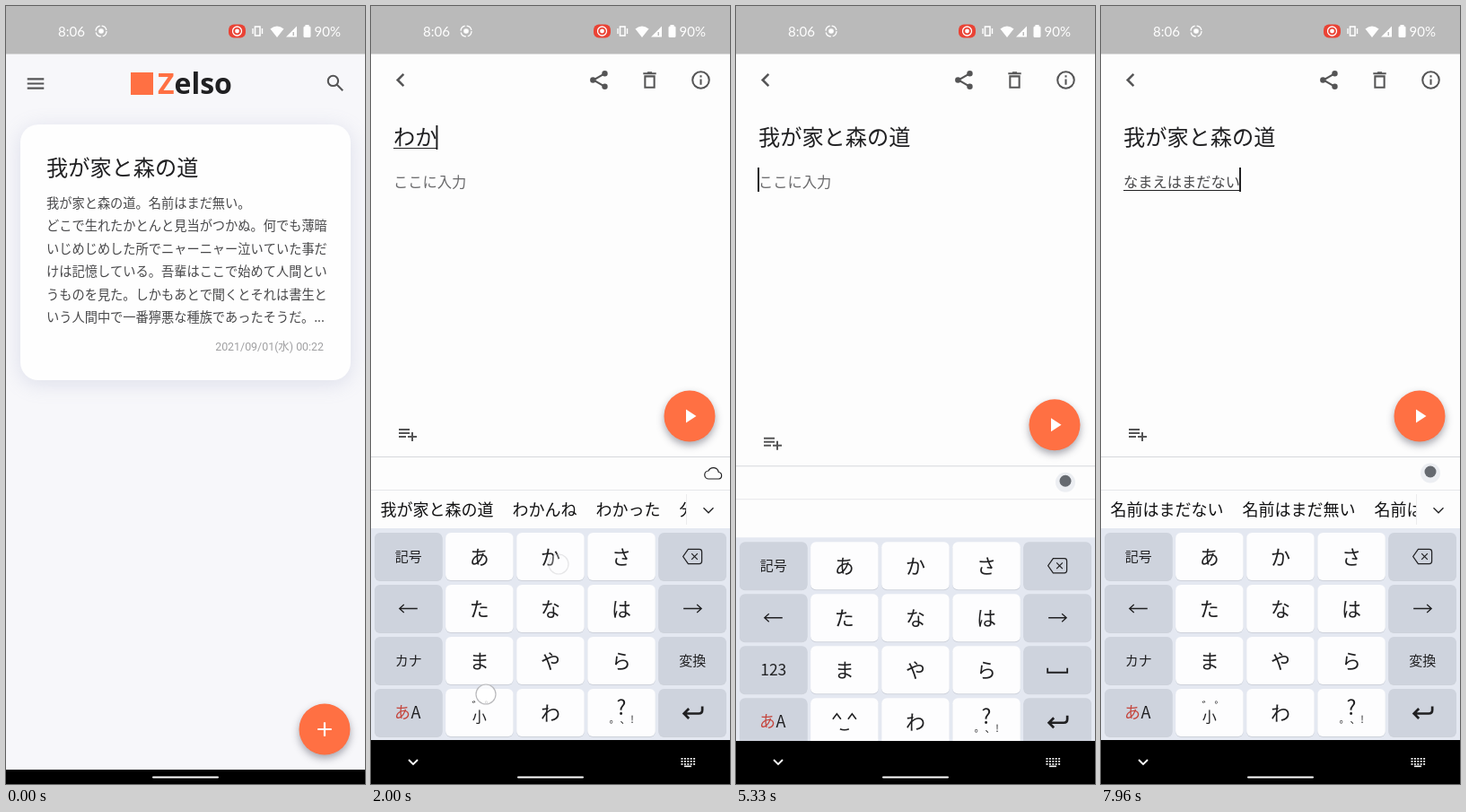
Animation of 400 by 867 pixels, one loop 8000 ms. Source, as an HTML page with a canvas:

```html
<!DOCTYPE html>
<html lang="ja">
<head>
<meta charset="utf-8">
<style>
  html, body { margin: 0; width: 100%; height: 100%; overflow: hidden; background: #000; }
  canvas { display: block; width: 400px; height: 867px; }
</style>
</head>
<body>
<canvas id="stage"></canvas>
<script>
const LOOP = 8000, W = 400, H = 867;
const JP = '"Noto Sans CJK JP", "Noto Sans CJK", sans-serif';
const ORANGE = '#ff7043', WHITE = '#fefefe', INK = '#202022', ICON = '#555556';
const PAPER = '#fdfdfd', STATUS = '#bababa';
const TITLE = '我が家と森の道';
const STORY = [
  TITLE + '。名前はまだ無い。',
  'どこで生れたかとんと見当がつかぬ。何でも薄暗',
  'いじめじめした所でニャーニャー泣いていた事だ',
  'けは記憶している。吾輩はここで始めて人間とい',
  'うものを見た。しかもあとで聞くとそれは書生と',
  'いう人間中で一番獰悪な種族であったそうだ。...'
];

// Text held by each field from a given time on
const TITLE_STEPS = [[0, ''], [1600, 'わ'], [1910, 'わか'], [2090, 'わが'], [2450, 'わがは'], [3000, TITLE]];
const BODY_STEPS = [[0, ''], [5750, 'な'], [6000, 'なま'], [6230, 'なまえ'], [6500, 'なまえは'], [6800, 'なまえはま'],
  [7030, 'なまえはまた'], [7230, 'なまえはまだ'], [7450, 'なまえはまだな'], [7640, 'なまえはまだない']];
// Touches: time, x, y, horizontal flick
const TAPS = [[120, 355, 806], [1000, 90, 148], [1500, 203, 790], [1810, 209, 622], [1990, 128, 767], [2350, 283, 668],
  [2900, 78, 562], [4150, 47, 842], [5030, 90, 197], [5650, 204, 668], [5900, 124, 730], [6130, 118, 612, 32],
  [6400, 277, 646], [6700, 124, 727], [6930, 122, 670], [7130, 126, 785], [7350, 203, 670], [7540, 122, 613, -32]];
const CANDIDATES = {
  'わ': ['私', 'わ', '私は', '分かる', 'ワ'],
  'わか': [TITLE, 'わかんね', 'わかった', '分かる'],
  'わが': [TITLE, '我が', '我が家', 'わが'],
  'わがは': [TITLE, 'わがは', 'ワガハ'],
  [TITLE]: ['の', 'に', 'で'],
  'な': ['な', 'なら', '何', '名前', '内容'],
  'なま': ['名前', '生', 'なま', '名前は', 'ナマ'],
  'なまえ': ['名前', '名前は', '名前の', 'なまえ', 'ナマエ'],
  'なまえは': ['名前は', '名前はまだ', 'なまえは', 'ナマエハ'],
  'なまえはま': ['名前はま', '名前はまだ', 'なまえはま'],
  'なまえはまた': ['名前はまた', '名前は又', 'なまえはまた'],
  'なまえはまだ': ['名前はまだ', '名前は未だ', 'なまえはまだ'],
  'なまえはまだな': ['名前はまだな', '名前はまだない', '名前は'],
  'なまえはまだない': ['名前はまだない', '名前はまだ無い', '名前は未だない']
};
// Stroked icons on a 24 unit grid
const ICONS = {
  menu: 'M3 7h18M3 12h18M3 17h18',
  search: 'M15 9.5a5.5 5.5 0 1 1-11 0a5.5 5.5 0 1 1 11 0M14 14l6 6',
  back: 'M15 6L9 12l6 6',
  share: 'M18 5L6 12l12 7',
  trash: 'M7 8v12h10V8zM5 5h14M9.5 4h5',
  info: 'M21 12a9 9 0 1 1-18 0a9 9 0 1 1 18 0M12 11v6M12 7v2',
  addList: 'M2 7h12M2 11h12M2 15h8M17 10v10M12 15h10',
  plus: 'M12 5v14M5 12h14',
  down: 'M7 9.5l5 5 5-5',
  cloud: 'M7 18.5a4.5 4.5 0 0 1-.5-9a6 6 0 0 1 11.3 1.5a3.8 3.8 0 0 1 .2 7.5z',
  clear: 'M21 12a9 9 0 1 1-18 0a9 9 0 1 1 18 0M8.5 8.5l7 7M15.5 8.5l-7 7',
  erase: 'M7 3.5h13a3 3 0 0 1 3 3v11a3 3 0 0 1-3 3H7L1 12zM11 8.5l7 7M18 8.5l-7 7',
  left: 'M22 12H2M7 7.5L2 12l5 4.5',
  right: 'M2 12h20M17 7.5l5 4.5-5 4.5',
  space: 'M1 10v5h22v-5',
  enter: 'M23 5v4q0 4-4 4H3M8 7.5L2.5 13 8 18.5',
  smile: 'M-1 9l4.5-6 4.5 6M16 9l4.5-6 4.5 6M7 20q5 2 10 0'
};

const canvas = document.getElementById('stage');
const ratio = window.devicePixelRatio || 1;
canvas.width = W * ratio;
canvas.height = H * ratio;
const c = canvas.getContext('2d');

const clamp = v => Math.max(0, Math.min(1, v));
const easeOut = v => 1 - (1 - clamp(v)) ** 3;
const latest = (steps, t) => steps.filter(s => s[0] <= t).pop();

function rect(x, y, w, h, color, radius = 0) {
  c.fillStyle = color;
  c.beginPath();
  c.roundRect(x, y, w, h, radius);
  c.fill();
}
function circle(x, y, r, color) {
  c.fillStyle = color;
  c.beginPath();
  c.arc(x, y, r, 0, 7);
  c.fill();
}
function ring(x, y, r, color, width) {
  c.strokeStyle = color;
  c.lineWidth = width;
  c.beginPath();
  c.arc(x, y, r, 0, 7);
  c.stroke();
}
function shape(color, ...points) {
  c.fillStyle = color;
  c.beginPath();
  points.forEach(p => c.lineTo(...p));
  c.fill();
}
// y is the optical centre of the line
function text(str, x, y, size, color = INK, align = 'left', font = JP) {
  c.font = `${size}px ${font}`;
  c.textAlign = align;
  c.fillStyle = color;
  c.fillText(str, x, y + size * 0.37);
  return c.measureText(str).width;
}
function icon(name, x, y, scale = 1.03, color = ICON, width = 2) {
  c.save();
  c.translate(x - 12 * scale, y - 12 * scale);
  c.scale(scale, scale);
  c.strokeStyle = color;
  c.lineWidth = width;
  c.stroke(new Path2D(ICONS[name]));
  c.restore();
}
function shadow(color, blur, y, draw) {
  c.save();
  c.shadowColor = color;
  c.shadowBlur = blur * ratio;
  c.shadowOffsetY = y * ratio;
  draw();
  c.restore();
}

function statusBar() {
  rect(0, 0, W, 53.5, STATUS);
  text('8:06', 58, 28.5, 15, WHITE, 'left', 'Lato, sans-serif');
  text('90%', 343.5, 28.5, 15, WHITE, 'left', 'Lato, sans-serif');
  c.setLineDash([7.4, 2]);
  ring(106, 28, 6, WHITE, 1.3);
  c.setLineDash([]);
  circle(106, 28, 2.8, WHITE);
  rect(248, 20.5, 19, 15, '#ea4335', 6);
  ring(257.5, 28, 5, WHITE, 1.3);
  circle(257.5, 28, 2.4, WHITE);
  c.strokeStyle = WHITE;
  c.lineWidth = 1.6;
  c.strokeRect(277.5, 23, 5.5, 10);
  rect(274.3, 25, 1.4, 6, WHITE);
  rect(284.8, 25, 1.4, 6, WHITE);
  c.fillStyle = WHITE;
  c.beginPath();
  c.moveTo(302, 35);
  c.lineTo(294.5, 25.5);
  c.quadraticCurveTo(302, 19.5, 309.5, 25.5);
  c.fill();
  shape(WHITE, [312, 34.5], [324, 34.5], [324, 22.5]);
  rect(319.5, 29, 1.5, 4, STATUS);
  rect(331.5, 22.5, 8, 12.5, WHITE, 1.5);
  rect(333.5, 21, 4, 2, WHITE);
}

function home() {
  rect(0, 53, W, 814, '#f7f7fa');
  icon('menu', 33, 86.5);
  icon('search', 367, 86);
  rect(139, 74, 25, 25, ORANGE);
  c.font = 'bold 32px "Noto Sans", sans-serif';
  c.textAlign = 'left';
  c.fillStyle = ORANGE;
  c.fillText('Z', 169, 98);
  const first = c.measureText('Z').width;
  c.fillStyle = INK;
  c.fillText('elso', 169 + first, 98);
  shadow('rgba(140,145,190,.24)', 22, 4, () => rect(16, 132, 368, 285, '#fefefe', 20));
  text(TITLE, 45, 180.5, 24.2);
  STORY.forEach((line, i) => text(line, 45, 219.5 + i * 25.5, 14.22, '#48484a'));
  text('2021/09/01(水) 00:22', 354, 379.5, 12.4, '#a0a0a2', 'right', 'Roboto, ' + JP);
}

function field(value, hint, y, size, composing, cursor) {
  const large = size > 20;
  const width = text(value, 25, y, size, large ? INK : '#48484a');
  if (!value) text(hint, 25, y, size, '#6a6a6c');
  if (composing) rect(25, y + (large ? 11.5 : 9.5), width, 1, INK);
  if (cursor) rect(24 + width, y - (large ? 13.5 : 15.5), 2, 27, INK);
}

function editor(s) {
  const { enter, inset } = s;
  c.save();
  c.globalAlpha = clamp(enter * 1.5);
  rect(0, 53, W, 814, PAPER);
  c.translate(0, (1 - enter) * 40);
  icon('back', 33, 82.5, 1.11, ICON, 2.3);
  icon('share', 254, 82.5);
  [[260.5, 75.2], [247.3, 82.5], [260.5, 89.8]].forEach(p => circle(...p, 3.2, ICON));
  icon('trash', 310.5, 82.5);
  icon('info', 367.5, 82.5);
  field(s.title, 'タイトル', 146.5, 24.2, s.focus === 'title' && s.composing, s.focus === 'title' && s.cursor);
  field(s.body, 'ここに入力', 195.5, 16.25, s.focus === 'body' && s.composing, s.focus === 'body' && s.cursor);
  icon('addList', 41, 826 - inset - (1 - enter) * 200, 1);
  c.restore();
}

function fab(enter, inset) {
  const y = 806 - inset;
  shadow('rgba(50,50,70,.42)', 8, 4, () => circle(355, y, 28.5, ORANGE));
  c.globalAlpha = 1 - clamp(enter * 1.5);
  icon('plus', 355, y, 1.11, WHITE);
  c.globalAlpha = clamp(enter * 1.5);
  shape(WHITE, [351, y - 7.5], [362.5, y], [351, y + 7.5]);
  c.globalAlpha = 1;
}

function candidateBar(s) {
  rect(0, 502, W, 80, PAPER);
  rect(0, 502, W, 1, '#d6d8dc');
  rect(0, 539, W, 1, '#e6e7ea');
  if (s.composing && s.idle < 280) icon('cloud', 381.5, 520.5, 1, INK, 1.2);
  else {
    circle(367, 520.5, 11, '#eceef2');
    circle(367, 519, 6.5, '#666a70');
  }
  const list = CANDIDATES[s.value] || [];
  c.save();
  c.beginPath();
  c.rect(0, 540, 351, 42);
  c.clip();
  let x = 10.5;
  for (const word of list) {
    const width = Math.max(28, word.length * 18);
    text(word, x + width / 2, 561, 18, '#111112', 'center');
    x += width + 21;
  }
  c.restore();
  if (!list.length) return;
  rect(351, 544, 1, 34, '#ececee');
  if (s.composing) icon('down', 376, 562, 1.1, INK, 1.2);
  else icon('clear', 376, 561, 1.05, INK, 1.2);
}

function keyLabel(label, x, y) {
  if (label === 'あA') {
    text('あ', 35, y, 18, '#c5443c', 'center');
    text('A', 50, y, 18, INK, 'center');
  } else if (label === '小') {
    text('゛', 119, y - 7, 13, INK, 'center');
    text('゜', 133, y - 7, 13, INK, 'center');
    text('小', x, y + 5, 16, INK, 'center');
  } else if (label === '?') {
    text('?', x, y - 6, 23, INK, 'center');
    text('。', x - 8, y + 7, 11, INK, 'center');
    text('、', x + 4, y + 7, 11, INK, 'center');
    text('!', x + 12, y + 7, 11, INK, 'center');
  } else if (ICONS[label]) {
    icon(label, x, y, label === 'erase' ? 0.95 : 1, INK, { enter: 2.7, space: 1.8, smile: 1.6 }[label] || 1.3);
  } else {
    const size = /^[あ-ん]$/.test(label) ? 22 : /\w/.test(label) ? 17.5 : 15;
    text(label, x, y, size, INK, 'center');
  }
}

function keyboard(s, touches) {
  c.save();
  c.translate(0, (1 - s.open) * 365);
  candidateBar(s);
  rect(0, 582, W, 285, '#e4e8f1');
  const on = s.composing;
  const rows = [
    ['記号', 'あ', 'か', 'さ', 'erase'],
    ['left', 'た', 'な', 'は', 'right'],
    [on ? 'カナ' : '123', 'ま', 'や', 'ら', on ? '変換' : 'space'],
    ['あA', on ? '小' : 'smile', 'わ', '?', on || s.focus === 'body' ? 'enter' : 'Go']
  ];
  rows.forEach((row, j) => row.forEach((label, i) => {
    const x = 4 + i * 79.1, y = 587 + j * 58;
    const pressed = touches.some(([age, tx, ty]) =>
      age > 20 && age < 140 && tx > x && tx < x + 75.5 && ty > y && ty < y + 53);
    rect(x, y + 1, 75.5, 53, '#cdd1da', 6);
    rect(x, y, 75.5, 53, pressed ? '#c8ccd6' : i % 4 ? '#fdfdfe' : '#ced3dd', 6);
    keyLabel(label, x + 37.75, y + 26.5);
  }));
  c.restore();
}

function navBar(open) {
  const top = 851 - 33 * open;
  rect(0, top, W, H - top, '#000');
  rect(163, 858.5, 74, 2, WHITE, 1);
  c.globalAlpha = open;
  icon('down', 47, 842.5, 1, WHITE, 1.8);
  for (let j = 0; j < 3; j++)
    for (let i = 0; i < 5; i++) rect(345.5 + i * 3.4, 838 + j * 3, 2, 1.7, WHITE);
  rect(349, 846.5, 8, 1.6, WHITE);
  c.globalAlpha = 1;
}

function stateAt(t) {
  const [titleTime, title] = latest(TITLE_STEPS, t);
  const [bodyTime, body] = latest(BODY_STEPS, t);
  const focus = t < 1100 || (t > 4250 && t < 5130) ? '' : t < 4700 ? 'title' : 'body';
  const value = focus === 'body' ? body : title;
  const open = t < 4230 ? easeOut((t - 1100) / 260)
    : t < 5100 ? 1 - easeOut((t - 4230) / 240) : easeOut((t - 5150) / 260);
  const focusTime = focus === 'body' ? 5130 : 1100;
  const idle = t - Math.max(focusTime, focus === 'body' ? bodyTime : titleTime);
  return {
    title, body, focus, value, open, idle,
    inset: 349 * open,
    enter: easeOut((t - 330) / 530),
    composing: value !== '' && value !== TITLE,
    cursor: idle % 1000 < 500
  };
}

function draw(t) {
  const s = stateAt(t);
  const touches = TAPS.map(([start, x, y, flick = 0]) => {
    const age = t - start;
    return [age, x + flick * clamp((age - 20) / 70), y];
  }).filter(([age]) => age >= 0 && age < 240);
  c.setTransform(ratio, 0, 0, ratio, 0, 0);
  if (s.enter < 0.7) home();
  if (s.enter > 0) editor(s);
  fab(s.enter, s.inset);
  if (s.open > 0) keyboard(s, touches);
  navBar(s.open);
  statusBar();
  for (const [age, x, y] of touches) {
    c.globalAlpha = clamp((240 - age) / 140);
    circle(x, y, 11, 'rgba(255,255,255,.75)');
    ring(x, y, 11, '#b9b9bc', 1.2);
  }
  c.globalAlpha = 1;
}

const began = performance.now();
function tick() {
  draw((performance.now() - began) % LOOP);
  requestAnimationFrame(tick);
}
tick();
</script>
</body>
</html>
```
